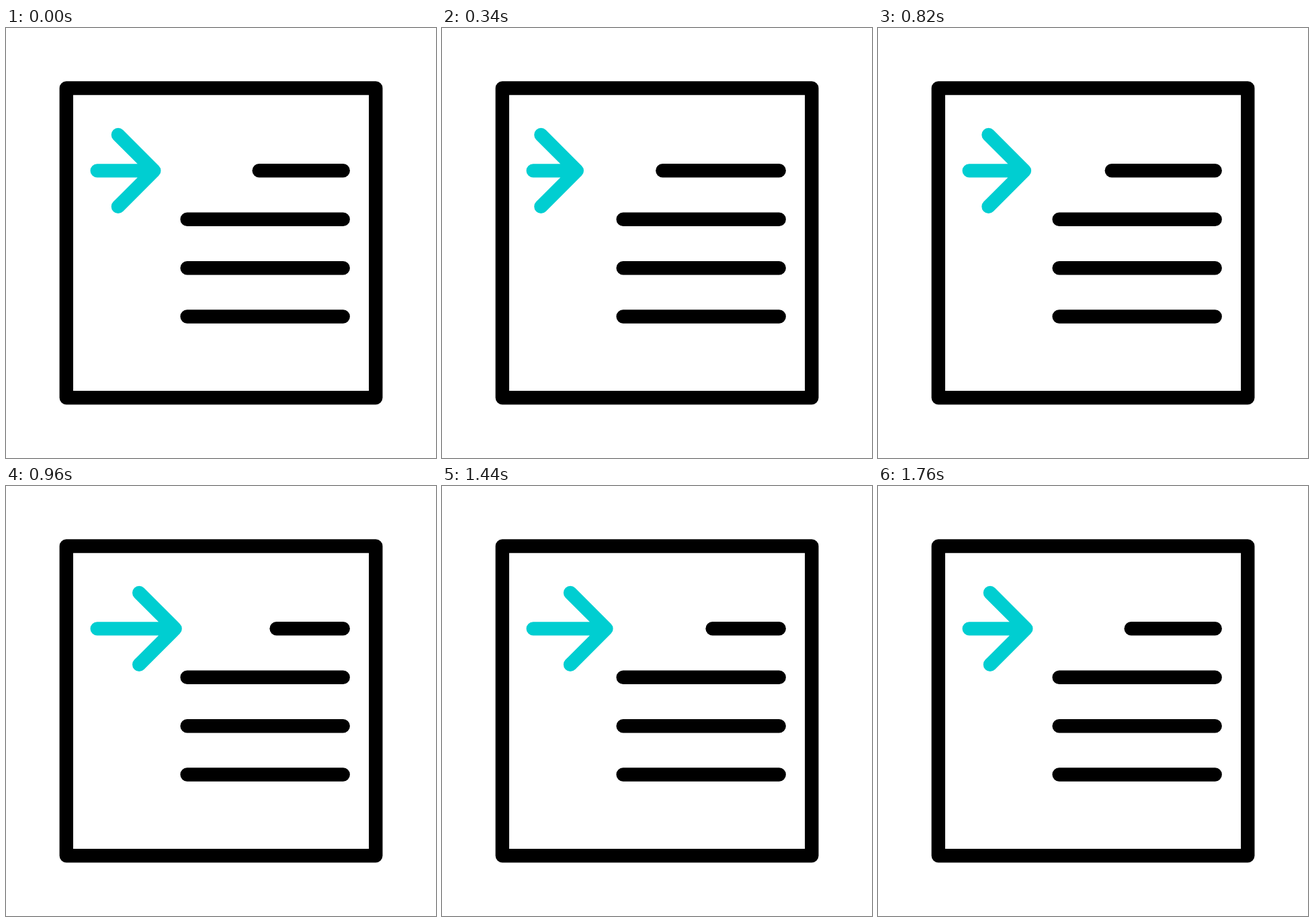
An HTML page that plays this animation: 640x640 px, repeating every 1800 ms.

```html
<!DOCTYPE html>
<html lang="en">
<head>
<meta charset="utf-8">
<title>Indent icon</title>
<style>
  html, body { margin: 0; height: 100%; overflow: hidden; background: #fff; }
  svg { display: block; width: 100%; height: 100%; }
  path { fill: none; stroke: #000; stroke-width: 20.4; stroke-linecap: round; stroke-linejoin: round; }
  #arrow { stroke: #00ced1; }
</style>
</head>
<body>
<svg viewBox="0 0 640 640">
  <path d="M89.8 89.5H550.3V550.3H89.8Z"/>
  <path d="M269.6 284.7H501.7M269.6 357.2H501.7M269.6 429.5H501.7"/>
  <path id="line"/>
  <path id="arrow"/>
</svg>
<script>
const LOOP = 1800, STEP = 20;
const line = document.getElementById('line');
const arrow = document.getElementById('arrow');

// time, arrow shift, line shift
const keys = [
  [0, 0, 0],
  [580, -29.3, -72.6],
  [1140, 45.3, 48.6],
  [1760, 0, 0],
];

// cubic-bezier(.5, 0, .5, 1)
function ease(x) {
  let lo = 0, hi = 1;
  for (let i = 0; i < 24; i++) {
    const mid = (lo + hi) / 2;
    if (1.5 * mid * (1 - mid) + mid ** 3 < x) lo = mid; else hi = mid;
  }
  return lo * lo * (3 - 2 * lo);
}

function shifts(time) {
  const next = keys.findIndex(key => key[0] > time);
  if (next < 0) return [0, 0];
  const a = keys[next - 1], b = keys[next];
  const k = ease((time - a[0]) / (b[0] - a[0]));
  return [1, 2].map(i => a[i] + (b[i] - a[i]) * k);
}

function draw(now) {
  const time = Math.floor((now % LOOP) / STEP) * STEP;
  const [arrowShift, lineShift] = shifts(time);
  const back = 166.9 + arrowShift, tip = back + 53.4;
  arrow.setAttribute('d', `M135.7 212.4H${tip}M${back} 159L${tip} 212.4L${back} 265.8`);
  line.setAttribute('d', `M${376.7 + lineShift} 212.2H501.7`);
}

const start = performance.now();
function tick() {
  draw(performance.now() - start);
  requestAnimationFrame(tick);
}
tick();
</script>
</body>
</html>
```
